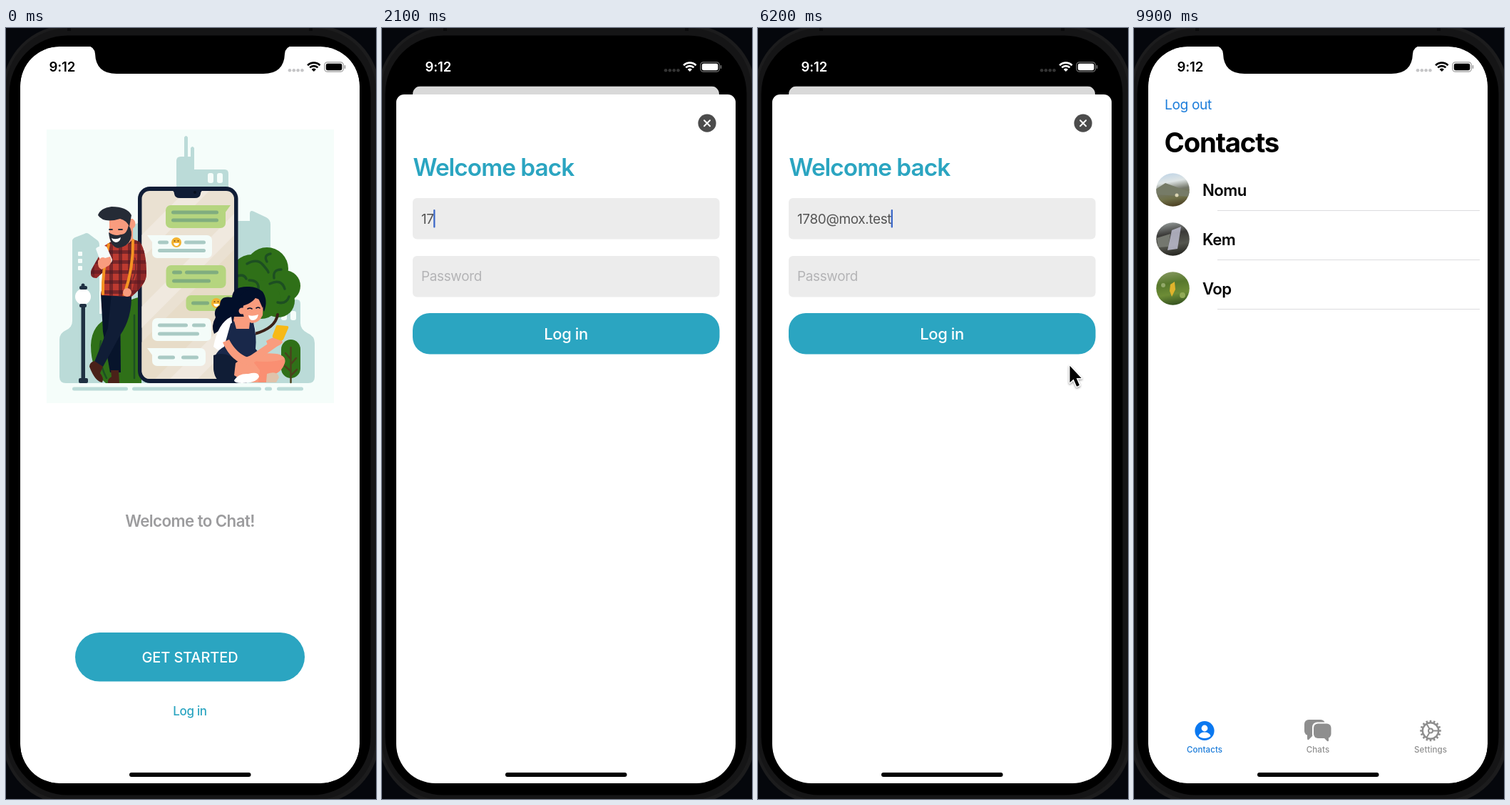
An HTML page with a canvas for the animation above (10 s loop, 519 by 1079 pixels).

```html
<!DOCTYPE html>
<html lang="en">
<head>
<meta charset="utf-8">
<title>Chat login</title>
<style>
html, body { margin: 0; width: 100%; height: 100%; overflow: hidden; background: #000; }
canvas { display: block; width: 519px; height: 1079px; }
</style>
</head>
<body>
<canvas id="stage"></canvas>
<script>
const W = 519, H = 1079, LOOP = 10;
const canvas = document.getElementById('stage');
const ctx = canvas.getContext('2d');
const dpr = window.devicePixelRatio || 1;
canvas.width = W * dpr;
canvas.height = H * dpr;

const TEAL = '#2ba5c1', MIST = '#bbdbd8', SKIN = '#f99c7e', NAVY = '#101d36';
const LEAF = '#2f7018', VEIN = '#1d4f22', GRAY = '#8e8e8e', BLUE = '#0a78f0';
const EMAIL = '1780@mox.test';
const OPEN = 1.15, FOCUS = 6.55, BLUR = 8.7, DONE = 9.3;

// --- drawing helpers ---
function fill(d, color) {
  ctx.fillStyle = color;
  ctx.fill(new Path2D(d));
}
function stroke(d, color, width = 2) {
  ctx.strokeStyle = color;
  ctx.lineWidth = width;
  ctx.lineCap = ctx.lineJoin = 'round';
  ctx.stroke(new Path2D(d));
}
function box(x, y, w, h, r, color) {
  ctx.beginPath();
  ctx.roundRect(x, y, w, h, r);
  ctx.fillStyle = color;
  ctx.fill();
}
function oval(x, y, rx, ry, color) {
  ctx.beginPath();
  ctx.ellipse(x, y, rx, ry, 0, 0, Math.PI * 2);
  ctx.fillStyle = color;
  ctx.fill();
}
const disc = (x, y, r, color) => oval(x, y, r, r, color);
const bar = (x1, x2, y, color, w = 5) => box(x1, y - w / 2, x2 - x1, w, w / 2, color);

// y is the middle of the capitals
function text(s, x, y, size, color, { weight = 400, align = 'left', track = -0.02 } = {}) {
  ctx.font = `${weight} ${size}px Inter, Roboto, sans-serif`;
  ctx.letterSpacing = track * size + 'px';
  ctx.textAlign = align;
  ctx.fillStyle = color;
  ctx.fillText(s, x, y + size * 0.364);
  return ctx.measureText(s).width;
}
function clipped(path, draw) {
  ctx.save();
  ctx.clip(path);
  draw();
  ctx.restore();
}
function roundPath(x, y, w, h, r) {
  const p = new Path2D();
  p.roundRect(x, y, w, h, r);
  return p;
}
const clamp = v => Math.min(1, Math.max(0, v));
const mix = (a, b, k) => a + (b - a) * k;
const ease = k => k * k * (3 - 2 * k);

// --- illustration ---
function skyline() {
  fill('M75 488V436Q75 427 84 423Q93 419 93 410V298Q93 295 97 293L110 288Q113 286 116 288L128 297Q131 299 131 304V400H172V284Q172 277 180 275L190 271H239V186Q239 180 245 180H250V153Q252.5 149 255 153V180H259V168Q261.5 164 264 168V198H307Q312 198 312 204V270H342V260Q342 254 348 257L365 265Q371 268 371 275V380H408Q413 380 413 386V413Q413 422 423 427Q433 431 433 441V488Q433 497 424 497H84Q75 497 75 488Z', MIST);
  for (const x of [283, 296]) box(x, 203, 8, 14, 3, '#f5fdfa');
  for (const x of [386, 399]) box(x, 396, 8, 13, 3, '#f5fdfa');
  for (const y of [313, 323, 333]) box(101, y, 6, 6, 1, '#f5fdfa');
  for (const [a, b] of [[93, 171], [177, 358], [363, 373], [380, 417]]) bar(a, b, 505, MIST);
}

function plants() {
  fill('M140 497Q119 480 119 444Q120 414 146 405Q160 382 190 376V497Z', LEAF);
  stroke('M141 490Q128 465 133 438M180 490V402', VEIN, 2.5);
  for (const [x, y, r] of [[366, 337, 30], [345, 348, 31], [391, 361, 22], [335, 378, 26], [382, 382, 23], [358, 380, 27]]) disc(x, y, r, LEAF);
  stroke('M349 428Q378 420 381 401', '#3b2018', 4);
  stroke('M338 330Q352 322 360 331T368 342M371 316Q361 318 366 327M386 338Q374 338 376 350M370 358Q386 350 391 365M341 353Q355 353 354 365M381 384Q393 387 397 376M325 347Q334 344 337 351', VEIN, 3.5);
  box(386, 436, 27, 54, 13.5, LEAF);
  stroke('M399.5 447V496M399 463L392 455M400 470L407 462M399 480L391 473M400 486L408 478', '#4b421d', 2.5);
}

function lamp() {
  const c = '#1f3042';
  box(105.5, 384, 5.5, 110, 1, c);
  box(102, 490, 13, 7, 2, c);
  disc(108, 376, 11, '#fff');
  box(103, 361, 11, 5, 2, c);
  disc(108, 360, 2.5, c);
  box(103, 386, 10, 5, 2, c);
}

function emoji(x, y) {
  disc(x, y, 7, '#f3b22f');
  fill(`M${x - 4} ${y + 1}h8q-1 4-4 4t-4-4Z`, '#fff');
  disc(x - 2.5, y - 2, 1, '#7b4a17');
  disc(x + 2.5, y - 2, 1, '#7b4a17');
}

function bubble(x, y, w, h, green, tail, lines) {
  const c = green ? '#b5d57f' : '#f4fcf9';
  box(x, y, w, h, 7, c);
  if (tail) fill(green ? `M${x + w - 14} ${y}h21l-8 11Z` : `M${x + 14} ${y}h-21l8 11Z`, c);
  for (const [a, b, ly] of lines) bar(a, b, ly, green ? '#80ad7f' : '#a9cac4');
}

function bigPhone() {
  box(185, 222, 140.5, 275, 17, NAVY);
  clipped(roundPath(190.5, 228, 129.5, 263, 11), () => {
    ctx.fillStyle = '#eae1d2';
    ctx.fillRect(190, 228, 131, 264);
    fill('M190 290L252 228H285L190 323ZM190 390L320 260V290L190 420Z', '#f0e9df');
    fill('M190 440L320 310V380L209 491H190Z', '#e7dcc8');
    fill('M230 491L320 401V440L269 491Z', '#f0e9df');
  });
  fill('M232 227Q236 228 236 232Q237 238 244 238H265Q272 238 273 232Q273 228 277 227Z', NAVY);
  disc(265, 230, 2, '#08101f');
  bubble(224, 248, 84, 32, true, true, [[232, 298, 258], [232, 298, 269]]);
  bubble(205, 290, 84, 32, false, true, [[213, 228, 300], [250, 280, 300], [213, 280, 311.5]]);
  bubble(224.5, 332, 84, 32, true, false, [[233, 247, 342], [251, 298, 342], [233, 287, 354]]);
  bubble(252.5, 374, 65, 22, true, true, [[260, 285, 385]]);
  bubble(205, 406, 83, 32, false, false, [[213, 255, 416], [261, 280, 416], [213, 271, 428]]);
  bubble(205, 448, 75, 25, false, true, [[213, 237, 461], [246, 270, 461]]);
  emoji(239, 300);
  emoji(295, 385);
}

function standingFigure() {
  fill('M133 372H160L161 482H146L136 425Z', '#07142b');
  fill('M148 372H176Q177 406 160 430L136 474L124 467L143 420Z', NAVY);
  fill('M124 466L136 474L132 483Q138 490 135 496Q125 495 117 474Q117 468 124 466Z', '#4a2119');
  fill('M147 479H158L159 497H143Q142 491 148 488Z', '#4a2119');
  const shirt = new Path2D('M139 304L153 296Q174 291 188 300Q197 312 197 345Q197 358 176 376L133 374L138 340L127 350Q116 350 120 338Z');
  clipped(shirt, () => {
    ctx.fillStyle = '#bd3a30';
    ctx.fillRect(115, 290, 85, 90);
    ctx.fillStyle = 'rgba(70,25,35,.55)';
    for (let x = 119; x < 200; x += 13) ctx.fillRect(x, 290, 5, 90);
    for (let y = 297; y < 380; y += 14) ctx.fillRect(115, y, 85, 5);
    fill('M139 300L119 338L126 353L140 339ZM186 300L200 310V360L174 378L183 345Z', 'rgba(105,25,32,.5)');
  });
  stroke('M144 303Q135 340 136 372M178 297Q179 335 166 373', '#f49322', 4);
  stroke('M181 322Q184 340 178 352', '#72282c', 1.5);
  disc(170, 370, 6, SKIN);
  fill('M145 267H178V295Q170 306 157 306Q146 303 145 292Z', SKIN);
  oval(176, 274, 5.5, 7, SKIN);
  fill('M129 262Q132 252 148 250Q170 250 176 262L173 278Q169 269 160 267Q137 274 129 262Z', '#252b36');
  fill('M144 286Q153 292 161 289Q169 290 172 276Q178 284 175 295Q171 306 157 308Q146 306 144 286Z', '#252b36');
  fill('M148 294Q154 297 161 293Q160 300 154 300Q149 299 148 294Z', '#fff');
  stroke('M145 282h4M158 282h5', '#252b36', 1.8);
  fill('M126 309Q127 307 130 306L138 305Q141 305 142 308L149 324Q149 328 146 329L137 331Q134 330 133 328Z', '#f4fbfa');
  fill('M129 326Q134 319 139 322L146 320Q150 326 145 332L134 338Q128 335 129 326Z', SKIN);
}

function sittingFigure() {
  const hair = '#020f2a', cloth = '#19284a';
  fill('M338 362Q318 362 317 377Q300 374 300 388Q290 394 294 405Q287 417 292 428Q302 421 313 419Q330 412 338 397L354 383L362 397Q368 381 360 369Q351 361 338 362Z', hair);
  fill('M320 404L342 404L347 431L315 435Z', SKIN);
  fill('M316 404Q297 413 291 446L304 456L316 434L343 441L350 434Q351 416 345 410L341 431L320 432Z', '#fff');
  fill('M315 414L320 410L323 421H341L342 412L347 412Q352 431 350 449L368 470L337 497H305Q291 493 291 471Q291 454 306 446Z', cloth);
  fill('M291 458Q311 451 327 469Q334 486 324 497H304Q291 492 291 474Z', NAVY);
  fill('M322 469Q344 452 380 456Q394 459 391 469Q386 480 366 484L360 496H336L320 486Z', SKIN);
  fill('M346 466Q374 469 391 463Q392 482 367 488L365 496H354L356 479Z', '#fa8f72');
  fill('M304 440L313 436Q323 455 339 461L373 438L384 443L341 473Q316 468 304 440Z', SKIN);
  fill('M365 438Q377 430 386 434L388 440Q381 449 367 444Z', SKIN);
  fill('M379 417Q380 415 383 416L394 417Q397 417 396 420L389 436Q387 438 384 437L376 434Q373 433 374 430Z', '#f7b916');
  fill('M334 383Q344 372 361 383L360 402Q355 413 345 413Q332 410 332 394Z', SKIN);
  fill('M327 390Q347 386 352 374L360 392Q367 377 356 367Q338 363 328 375Z', hair);
  disc(331, 396, 4.5, SKIN);
  fill('M340 402Q346 404 354 401Q352 410 345 409Q341 408 340 402Z', '#fff');
  stroke('M339 393q3-2 6 0M351 392q3-2 5 0', hair, 1.6);
  fill('M320 493Q326 483 340 484Q354 480 355 488Q351 497 331 497Q320 497 320 493Z', '#fff');
  fill('M366 484Q381 479 383 489L379 496H365Z', '#dfc3ab');
}

function illustration() {
  ctx.fillStyle = '#f5fdfa';
  ctx.fillRect(57, 142, 403, 383);
  skyline();
  plants();
  lamp();
  bigPhone();
  standingFigure();
  sittingFigure();
}

// --- screens ---
function welcome() {
  illustration();
  text('Welcome to Chat!', 258, 690, 22.3, '#9c9c9e', { weight: 600, align: 'center', track: -0.026 });
  box(97, 846, 322, 68.5, 34.25, TEAL);
  text('GET STARTED', 258, 880.5, 20, '#fff', { weight: 500, align: 'center', track: -0.005 });
  text('Log in', 258, 955.5, 17, TEAL, { weight: 500, align: 'center' });
}

function caret(x, y) {
  box(x, y - 12.5, 2.3, 25.5, 1, '#3b68c8');
}

function sheet(t) {
  box(20, 93, 476, 1100, [11, 11, 0, 0], '#fff');
  disc(456, 133.2, 12.6, '#4c4c4c');
  stroke('M452 129.2l8 8m0-8l-8 8', '#fff', 2);
  text('Welcome back', 43.5, 194.5, 33.4, TEAL, { weight: 600, track: -0.03 });
  box(43, 238, 430.5, 57.5, 6, '#ececec');
  box(43, 319, 430.5, 57.5, 6, '#ececec');

  const typed = EMAIL.slice(0, Math.max(0, Math.floor((t - 2.05) / 0.32) + 2));
  const w = typed ? text(typed, 55, 267, 19, '#555') : 0;
  if (!typed) text('Email', 55, 267, 19, '#b4b4b6');
  if (t < FOCUS) caret(54.5 + w, 266.5);

  const dots = Math.min(6, Math.max(0, Math.floor((t - 6.75) / 0.25) + 1));
  if (!dots) text('Password', 55, 347.5, 19, '#b4b4b6');
  for (let i = 0; i < dots; i++) disc(60.5 + i * 11.8, 347.3, 4.5, '#484848');
  if (t >= FOCUS && t < BLUR) caret(54 + dots * 11.8, 346);

  box(43, 399, 430.5, 57.5, 24, TEAL);
  text('Log in', 258, 428, 22, t > BLUR ? '#e3f3f7' : '#fff', { weight: 500, align: 'center' });
}

function avatar(y, stops, detail) {
  const g = ctx.createLinearGradient(50, y - 23, 58, y + 23);
  stops.forEach((c, i) => g.addColorStop(i / (stops.length - 1), c));
  disc(54.5, y, 23.3, g);
  clipped(roundPath(31.2, y - 23.3, 46.6, 46.6, 23.3), detail);
}

function gear(x, y) {
  ctx.strokeStyle = GRAY;
  ctx.lineCap = 'butt';
  const ring = (r, w) => {
    ctx.lineWidth = w;
    ctx.beginPath();
    ctx.arc(x, y, r, 0, Math.PI * 2);
    ctx.stroke();
  };
  const spokes = (n, r1, r2, w) => {
    ctx.lineWidth = w;
    ctx.beginPath();
    for (let i = 0; i < n; i++) {
      const a = i * Math.PI * 2 / n, c = Math.cos(a), s = Math.sin(a);
      ctx.moveTo(x + c * r1, y + s * r1);
      ctx.lineTo(x + c * r2, y + s * r2);
    }
    ctx.stroke();
  };
  ring(11.2, 2.4);
  ring(3, 2);
  spokes(16, 11.5, 14.8, 2.6);
  spokes(3, 3.5, 11, 2);
}

function contacts() {
  text('Log out', 43, 107, 19.2, '#1b7cda');
  text('Contacts', 42.5, 160, 38.3, '#000', { weight: 700, track: -0.03 });
  avatar(226.5, ['#c3d6e6', '#dfe5e5', '#74776a', '#6f7048', '#4b3f22'], () => {
    fill('M30 226L44 217L80 230V236L30 233Z', '#767b67');
    disc(60, 234, 2.5, '#d9d3b2');
  });
  avatar(295.5, ['#8d9391', '#3b3a38', '#55564f', '#25251f'], () => {
    fill('M32 294L51 288L48 306L34 307Z', '#74776f');
    fill('M53 283L66 278L61 309L47 311Z', 'rgba(196,196,214,.8)');
  });
  avatar(364.5, ['#82965c', '#57782c', '#6d8c36', '#34521f'], () => {
    fill('M51 359L57 355L58 366L53 376L50 368Z', '#e0b32c');
    disc(41, 360, 3, '#92a96a');
    disc(68, 374, 4, '#91aa56');
  });
  ['Nomu', 'Kem', 'Vop'].forEach((name, i) => {
    const y = 227 + i * 69;
    text(name, 96, y, 22.2, '#000', { weight: 600, track: -0.025 });
    ctx.fillStyle = '#dcdcde';
    ctx.fillRect(117, y + 28, 368, 1);
  });

  disc(99, 983.5, 13.6, BLUE);
  disc(99, 980, 4.4, '#fff');
  fill('M90.5 991Q92 985.5 99 985.5T107.5 991Q104 994 99 994T90.5 991Z', '#fff');
  box(239, 968, 29, 22, 6, GRAY);
  fill('M243 987h11l-9 9q-2 1-2-2Z', GRAY);
  box(250, 971.5, 28, 24, 7, '#fff');
  box(252, 973.5, 24.5, 20.5, 6, GRAY);
  fill('M264 991h9v6q0 2-2 1Z', GRAY);
  gear(416, 983.5);
  const label = (s, x, c) => text(s, x, 1009.8, 11.5, c, { weight: 500, align: 'center', track: 0.008 });
  label('Contacts', 99, '#1a7bd9');
  label('Chats', 258, GRAY);
  label('Settings', 416, GRAY);
}

// --- device ---
function bezel() {
  ctx.fillStyle = '#05070c';
  ctx.fillRect(0, 0, W, H);
  box(-5, -4, 529, 1090, 92, '#1c1c1d');
  box(-1, 0, 520, 1081, 88, '#151516');
  box(4.5, 10.5, 507, 1063, 82, '#000');
  ctx.fillStyle = '#0a0a0b';
  ctx.fillRect(86, 0, 5, 4);
  ctx.fillRect(425, 0, 5, 4);
}

function statusBar(dark) {
  const c = dark ? '#fff' : '#000';
  fill('M114 25Q124 26 125 36Q126 64 155 64H361Q390 64 391 36Q392 26 402 25Z', '#000');
  text('9:12', 60.5, 54.7, 18.6, c, { weight: 600, track: -0.01 });
  for (let i = 0; i < 4; i++) disc(398 + i * 5.8, 59.2, 2.3, dark ? '#343434' : '#c5c5c7');
  ctx.strokeStyle = c;
  ctx.lineCap = 'butt';
  for (const [r, w] of [[12.3, 2.7], [7.9, 2.7], [2.2, 4.4]]) {
    ctx.lineWidth = w;
    ctx.beginPath();
    ctx.arc(431.8, 61, r, -Math.PI * 0.75, -Math.PI * 0.25);
    ctx.stroke();
  }
  ctx.strokeStyle = dark ? '#777' : '#999';
  ctx.lineWidth = 1.2;
  ctx.stroke(roundPath(446.8, 47.8, 26.4, 13.4, 4));
  box(448.8, 49.8, 22.5, 9.5, 2.3, c);
  box(474.6, 52, 1.6, 5, 1, dark ? '#777' : '#999');
}

function pointer(t) {
  let x, y;
  if (t >= 0.4 && t < 1.25) {
    const k = ease(clamp((t - 0.4) / 0.6));
    x = mix(468, 265, k);
    y = mix(900, 958, k);
  } else if (t >= 6 && t < DONE) {
    const a = ease(clamp((t - 6) / 0.5)), b = ease(clamp((t - 8.2) / 0.4));
    x = mix(mix(472, 374.5, a), 451.5, b);
    y = mix(mix(547, 338, a), 412, b);
  } else return;
  ctx.save();
  ctx.translate(x, y);
  ctx.shadowColor = 'rgba(0,0,0,.4)';
  ctx.shadowBlur = 3 * dpr;
  ctx.shadowOffsetY = 1.5 * dpr;
  const arrow = 'M0 0V23.5L5.2 18.6L9.7 28.8L13.5 27.1L9.2 17.2H16.2Z';
  stroke(arrow, '#fff', 3);
  ctx.shadowColor = 'transparent';
  fill(arrow, '#000');
  ctx.restore();
}

function render(t) {
  ctx.setTransform(dpr, 0, 0, dpr, 0, 0);
  bezel();
  const done = t >= DONE;
  const u = Math.max(0, t - OPEN) * 14.8;
  const rest = u > 12 ? 0 : (1 + u) * Math.exp(-u);
  const p = done ? 0 : 1 - rest;

  clipped(roundPath(20, 26, 476, 1031, 55), () => {
    const s = mix(1, 0.903, p), top = mix(26, 81.5, p);
    ctx.save();
    ctx.translate(258, top);
    ctx.scale(s, s);
    ctx.translate(-258, -26);
    ctx.clip(roundPath(20, 26, 476, 1031, mix(55, 12, clamp(p * 1.2))));
    ctx.fillStyle = '#fff';
    ctx.fillRect(20, 26, 476, 1031);
    if (done) contacts();
    else welcome();
    ctx.fillStyle = `rgba(0,0,0,${0.15 * p})`;
    ctx.fillRect(20, 26, 476, 1031);
    ctx.restore();
    if (p > 0) {
      ctx.save();
      ctx.translate(0, 964 * rest);
      sheet(t);
      ctx.restore();
    }
  });
  statusBar(p > 0.4);
  box(173, 1042, 170.5, 6, 3, '#000');
  pointer(t);
}

function tick(now) {
  render(now / 1000 % LOOP);
  requestAnimationFrame(tick);
}
requestAnimationFrame(tick);
</script>
</body>
</html>
```
